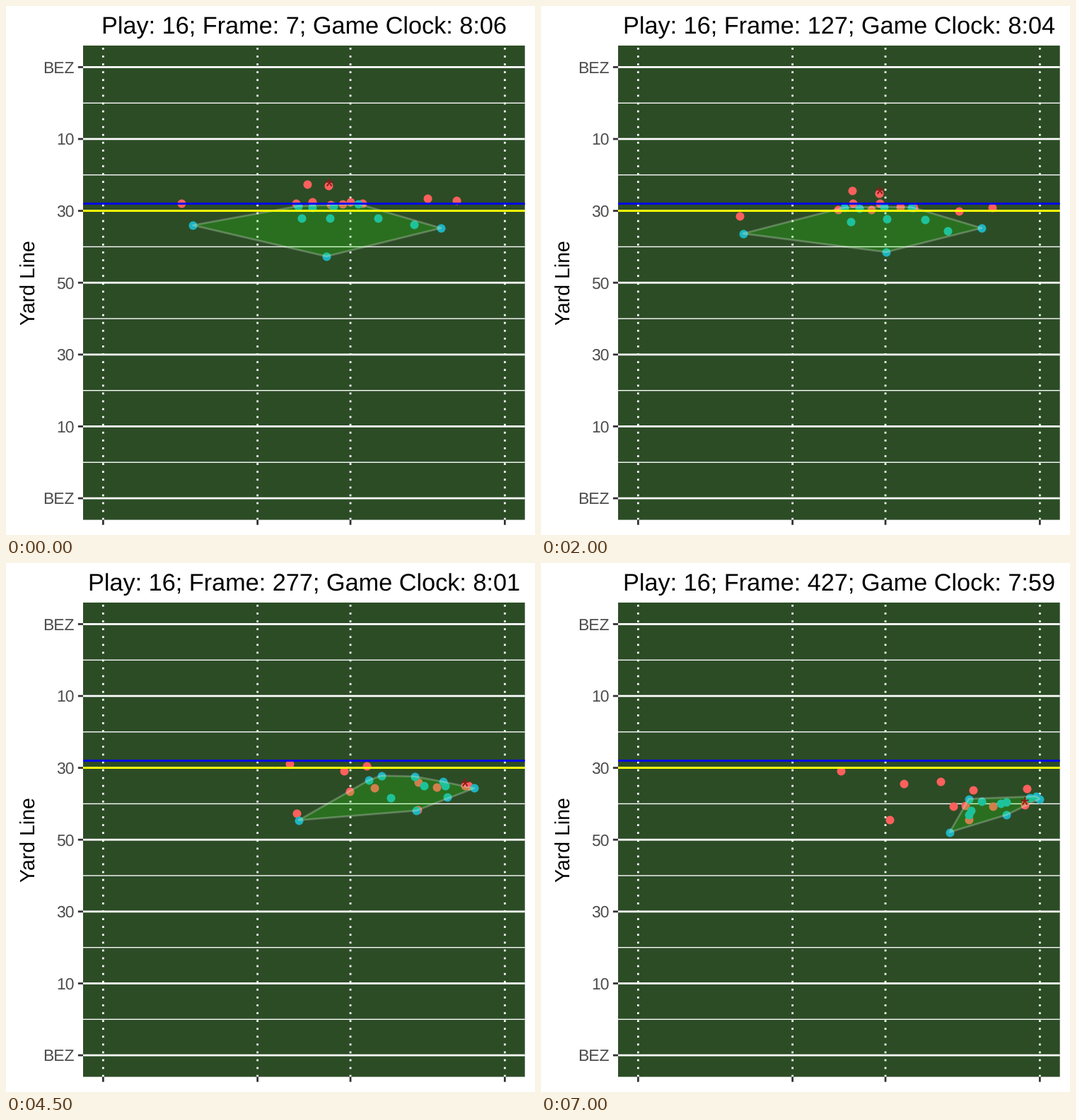
A matplotlib script for the animation above (7.5 s loop, 748x748 px).

```python
import numpy as np
import matplotlib.pyplot as plt
from matplotlib.animation import FuncAnimation
from matplotlib.patches import Polygon, Rectangle

SIZE, DPI = 748, 100
PT = 72 / DPI  # points per pixel
STEPS, INTERVAL = 15, 500
TURN = 8  # step at which every player reaches the middle of his run

LEFT, RIGHT, TOP, BOTTOM = 109, 733.7, 55.95, 726.55
MID_X, MID_Y = (LEFT + RIGHT) / 2, (TOP + BOTTOM) / 2
YARD = (BOTTOM - TOP) / 132  # 120 yards plus 5 % at each end
FONT, STROKE, TICK = 28.57, 2.77, 7.14
FIELD, RED, CYAN, MAROON = "#2c4c26", "#fc605d", "#1eb3bf", "#8b1a1a"

plt.rcParams["font.family"] = "Liberation Sans"
plt.rcParams["text.hinting"] = "none"

# Each run: start, turn and finish
passer = (456.5, 254), (392.5, 280), (424.5, 294)
runner = (426, 252), (635, 304.5), (684, 341.5)
receivers = [
    [(248, 278.5), (379, 350.5), (493.5, 362.5)],
    [(596.5, 272), (573.5, 344), (605, 363)],
    [(637.5, 275), (641.5, 313), (687, 319)],
]
blockers = [
    [(410.5, 278.5), (449, 315), (583, 344)],
    [(433.5, 276.5), (465, 286.5), (513, 312)],
    [(459, 281), (491, 308.5), (600, 343)],
    [(476, 279.5), (489, 278.5), (565.5, 309)],
    [(487, 277), (572, 306.5), (611.5, 320.5)],
    [(504, 278.5), (597, 306), (639, 344)],
]
rushers = [
    [(413, 283), (476, 290.5), (608, 350)],
    [(433, 285), (502, 288), (605, 333.5)],
    [(463.5, 283), (550, 287), (650, 340)],
    [(498.5, 280), (602, 298), (658, 338)],
]
backers = [
    [(418, 299.5), (499, 323), (658.5, 356)],
    [(458.5, 299.5), (579, 307), (623, 337)],
    [(526, 299.5), (593, 309), (691.5, 332)],
]
backs = [
    [(264.5, 310), (350.5, 357), (578, 380.5)],
    [(453, 354), (593, 329.5), (705, 333.5)],
    [(577, 308.5), (570.5, 348), (605, 355.5)],
    [(615, 314), (647, 314), (700, 330)],
]
offence = np.array([passer, runner, *receivers, *blockers])
defence = np.array([*rushers, *backers, *backs])


def positions(team, i):
    """Speed up from rest until the turn, then slow down to the finish."""
    start, turn, finish = np.moveaxis(team, 1, 0)
    if i <= TURN:
        return start + (turn - start) * (i / TURN) ** 2
    left = (STEPS - 1 - i) / (STEPS - 1 - TURN)
    return finish + (turn - finish) * left ** 1.8


def hull(points):
    """Convex hull by monotone chain."""
    pts = sorted(map(tuple, points))

    def chain(seq):
        out = []
        for p in seq:
            while len(out) > 1:
                (ax, ay), (bx, by) = out[-2:]
                if (bx - ax) * (p[1] - ay) - (by - ay) * (p[0] - ax) > 0:
                    break
                out.pop()
            out.append(p)
        return out[:-1]

    return np.array(chain(pts) + chain(pts[::-1]))


fig = plt.figure(figsize=(SIZE / DPI, SIZE / DPI), dpi=DPI, facecolor="white")
ax = fig.add_axes([0, 0, 1, 1])
ax.set_xlim(0, SIZE)
ax.set_ylim(SIZE, 0)
ax.axis("off")


def line(x, y, color="white", width=STROKE, z=1, **kw):
    ax.plot(x, y, color=color, lw=width * PT, zorder=z, snap=False,
            solid_capstyle="butt", dash_capstyle="butt", **kw)


def label(x, y, text, px, color="black", **kw):
    return ax.text(x, y, text, fontsize=px * PT, color=color,
                   va="baseline", **kw)


def dots(color, z):
    return ax.scatter([], [], s=(12 * PT) ** 2, c=color, lw=0, zorder=z)


def yard_y(yards):
    return TOP + (6 + yards) * YARD


# Field and axes
ax.add_patch(Rectangle((LEFT, TOP), RIGHT - LEFT, BOTTOM - TOP,
                       fc=FIELD, lw=0, snap=False))
for yards in range(10, 120, 20):
    line([LEFT, RIGHT], [yard_y(yards)] * 2, width=STROKE / 2)
for i, name in enumerate(["BEZ", "10", "30", "50", "30", "10", "BEZ"]):
    y = yard_y(20 * i)
    line([LEFT, RIGHT], [y, y])
    line([LEFT - TICK, LEFT], [y, y], "#333333")
    label(96.3, y + 8.2, name, 0.8 * FONT, "#4d4d4d", ha="right")
for offset in (-284, -65.7, 65.7, 284):
    x = MID_X + offset
    line([x, x], [BOTTOM, TOP], linestyle=(0, (1, 3)))
    line([x, x], [BOTTOM, BOTTOM + TICK], "#333333")
label(40.5, MID_Y, "Yard Line", FONT, rotation=90,
      rotation_mode="anchor", ha="center")

# Scrimmage and first-down lines
line([LEFT, RIGHT], [yard_y(38)] * 2, "#0000ff", z=7)
line([LEFT, RIGHT], [yard_y(40)] * 2, "#ffff00", z=7)

# Moving parts
title = label(MID_X, 39.3, "", 1.2 * FONT, ha="center")
red_dots, cyan_dots = dots(RED, 3), dots(CYAN, 4)
shell = Polygon(hull(defence[:, 0]), closed=True, fc="#22ff0833",
                ec=(1, 1, 1, 0.25), lw=STROKE * PT, joinstyle="round",
                zorder=5)
ax.add_patch(shell)
star = label(0, 0, "*", 32, MAROON, ha="center", zorder=6)

# Steps at which the game clock drops one second
TICKS = [1, 4, 5, 7, 9, 11, 13]


def update(i):
    secs = 486 - np.searchsorted(TICKS, i, side="right")
    title.set_text(f"Play: 16; Frame: {7 + 30 * i}; "
                   f"Game Clock: {secs // 60}:{secs % 60:02d}")
    reds, cyans = positions(offence, i), positions(defence, i)
    red_dots.set_offsets(reds)
    cyan_dots.set_offsets(cyans)
    shell.set_xy(hull(cyans))
    # The ball goes from passer to runner in the first three steps
    handoff = min(i / 3, 1)
    x, y = reds[0] + (reds[1] - reds[0]) * handoff
    star.set_position((x, y + 11.5))
    return title, red_dots, cyan_dots, shell, star


anim = FuncAnimation(fig, update, frames=STEPS, interval=INTERVAL,
                     repeat=True, repeat_delay=0, blit=False)
plt.show()
```
